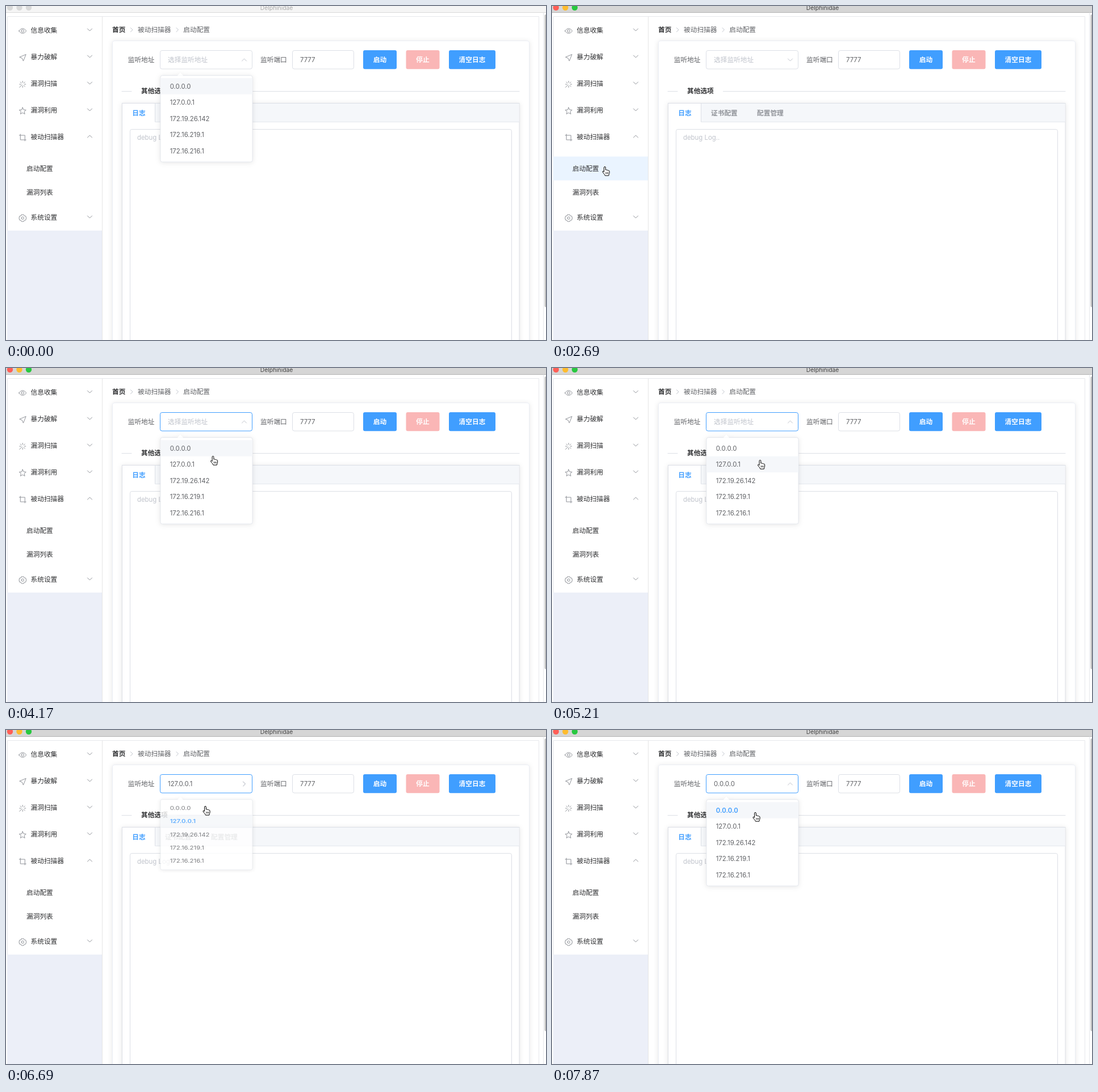
Recreate the animation shown at these times as an HTML page. Size 951 by 589 pixels, loop 8000 ms.

```html
<!DOCTYPE html>
<html lang="zh-CN">
<head>
<meta charset="utf-8">
<style>
html, body { margin: 0; width: 100%; height: 100%; overflow: hidden; background: #fff; }
svg { display: block; }
text { font: 11.7px Inter, "Noto Sans CJK SC", "Noto Sans CJK", sans-serif; fill: #606266; }
.latin { font-size: 11.4px; }
.dark { fill: #303133; }
.hint { fill: #c0c4cc; }
.tab { fill: #909399; }
.bold { font-weight: 600; }
.btn { fill: #fff; text-anchor: middle; font-weight: 600; }
.line { fill: none; stroke: #909399; stroke-linejoin: round; stroke-linecap: round; }
.soft { filter: drop-shadow(0 1.5px 4px rgba(0,0,0,.1)); }
</style>
</head>
<body>
<svg id="stage" width="951" height="589" viewBox="0 0 951 589"></svg>
<script>
const LOOP = 8000, TICK = 147.5;
const bursts = [0, 1790, 2690, 3870, 5060, 6110, 7280];
const hosts = ['0.0.0.0', '127.0.0.1', '172.19.26.142', '172.16.219.1', '172.16.216.1'];
// [time, x, y] of the pointer
const path = [
  [1790, 134, 381], [2080, 95, 291], [2690, 95, 291], [3270, 372, 116], [3410, 380, 109],
  [3720, 378, 105], [4020, 368, 150], [4165, 366.5, 163], [4470, 368, 171], [4750, 369, 178],
  [4900, 366, 233], [5060, 367, 190], [5200, 368.5, 170], [6110, 368.5, 170], [6400, 360, 100],
  [6560, 358, 92], [6700, 353, 142], [7130, 352, 147], [7430, 355, 92], [7570, 357, 90],
  [7722, 359, 130], [7870, 360, 153]
];
// [time, 1 = list opens, 0 = list closes]
const toggles = [[0, 0], [3620, 1], [6100, 0], [6597, 1], [7110, 0], [7570, 1]];

const rect = (x, y, w, h, fill, more = '') =>
  `<rect x="${x}" y="${y}" width="${w}" height="${h}" fill="${fill}" ${more}/>`;
const text = (x, y, s, cls = '', more = '') => `<text x="${x}" y="${y}" class="${cls}" ${more}>${s}</text>`;
const line = (d, color = '#909399', more = '') => `<path class="line" d="${d}" style="stroke:${color}" ${more}/>`;
const field = (x, y, w, h, more = '') => rect(x, y, w, h, '#fff', `rx="3.3" stroke="#dcdfe6" ${more}`);

const icons = [
  'M-6.5 0Q0-9 6.5 0Q0 9-6.5 0zM-2.3 0a2.3 2.3 0 1 0 4.6 0a2.3 2.3 0 1 0-4.6 0',
  'M5.5-5.5L-5.5-.8L-1 1L1 5.7z',
  'M-5.5 5.5L-1 1M0-5.5v2.5M5.5 0h-2.5M-5.5 0h2.5M0 5.5v-2.5M4-4l-2 2M-4-4l2 2M4 4l-2-2',
  'M0-6L1.8-2L6-1.6L2.9 1.2L3.8 5.5L0 3.3L-3.8 5.5L-2.9 1.2L-6-1.6L-1.8-2z',
  'M-6-4H4V6M-4-6V4H6',
  'M-2-6H2L3-4L5.5-3.5L6.3 0L5.5 3.5L3 4L2 6H-2L-3 4L-5.5 3.5L-6.3 0L-5.5-3.5L-3-4zM-2.2 0a2.2 2.2 0 1 0 4.4 0a2.2 2.2 0 1 0-4.4 0'
];
const menu = ['信息收集', '暴力破解', '漏洞扫描', '漏洞利用', '被动扫描器', '系统设置'].map((name, i) => {
  const y = i < 5 ? 43 + 47 * i : 373;
  const arrow = i == 4 ? `M143.5 ${y + 1}l4-4l4 4` : `M143.5 ${y - 3}l4 4l4-4`;
  return line(icons[i], '#909399', `transform="translate(29.3 ${y + 1})"`) +
    text(43.5, y + 4.3, name, 'dark') + line(arrow);
}).join('');

const button = (x, w, color, name) =>
  rect(x, 78, w, 33.3, color, 'rx="3"') + text(x + w / 2, 99, name, 'btn');

stage.innerHTML =
  // window
  rect(0, 0, 951, 589, '#fff') +
  rect(0, 0, 951, 11, '#d6d6d6', 'id="bar"') + rect(0, 11, 951, 1, '#b4b4b4', 'id="edge"') +
  [7, 23.5, 40].map(x => `<circle class="light" cx="${x}" cy="2.8" r="5.2"/>`).join('') +
  text(476.5, 6.6, 'Delphinidae', '', 'id="title" text-anchor="middle" style="font-size:10.3px"') +
  line('M2.5 589V18.5H938.5V589M946.5 12V589', '#e6e8ec') +
  rect(948.5, 15, 4, 516, '#c1c1c1', 'rx="2"') +
  // sidebar
  rect(2, 396, 167, 193, '#eceff8') +
  rect(2, 265.5, 167, 42, '#eaf4ff', 'id="focus"') +
  line('M169.5 19V589', '#e6e6e6') + menu +
  text(36, 291.3, '启动配置', 'dark') + text(36, 333.3, '漏洞列表', 'dark') +
  // breadcrumb
  text(187, 46.3, '首页', 'dark bold') + text(232, 46.3, '被动扫描器') + text(312.3, 46.3, '启动配置') +
  line('M219.5 38.5l3.5 3.5l-3.5 3.5M300 38.5l3.5 3.5l-3.5 3.5', '#c0c4cc') +
  // form
  rect(187.5, 61.5, 734, 600, '#fff', 'rx="3.5" stroke="#ebeef5" class="soft"') +
  text(214.7, 99.3, '监听地址') + field(271.5, 78.5, 162, 32.5, 'id="select"') +
  text(285, 99.2, '', 'latin', 'id="value"') + line('M-4 2l4-4l4 4', '#c0c4cc', 'id="caret"') +
  text(448, 99.3, '监听端口') + field(504.5, 78.5, 108, 32.5) + text(518, 99.2, '7777', 'latin') +
  button(629, 59, '#409eff', '启动') + button(704.5, 59, '#fab6b6', '停止') + button(780, 82, '#409eff', '清空日志') +
  line('M204 150.5H221M301.5 150.5H904', '#dcdfe6') + text(238, 154.3, '其他选项', 'dark bold') +
  // tabs
  rect(204.5, 171.5, 699.5, 500, '#fff', 'stroke="#dcdfe6" class="soft"') +
  rect(205, 172, 698.5, 32, '#f5f7fa') + line('M205 204.5H903.5', '#e4e7ed') +
  rect(205, 172, 57.5, 34, '#fff') + line('M262.5 172V204', '#dcdfe6') +
  text(222.3, 192.8, '日志', 'bold', 'style="fill:#409eff"') +
  text(280, 192.8, '证书配置', 'tab bold') + text(361, 192.8, '配置管理', 'tab bold') +
  field(218.5, 217.5, 672, 450) + text(231, 235.6, 'debug Log..', 'latin hint') +
  // drop-down list
  '<g id="list"><g class="soft">' + rect(272, 122.5, 162, 152.5, '#fff', 'rx="3.3" stroke="#e4e7ed"') +
  '<path d="M302 122.8L307 117.5L312 122.8z" fill="#fff"/></g>' +
  rect(272, 0, 162, 28.5, '#f5f7fa', 'id="hover"') +
  hosts.map((h, i) => text(288.7, 145.7 + 28.5 * i, h, 'latin host')).join('') + '</g>' +
  // pointer
  '<g id="hand"><path d="M-3.4 1.5V-6q0-1.6 1.4-1.6t1.4 1.6v4q1.8-.9 2.4.5q1.8-.7 2.3.7q2-.4 2 1.3v2.5q0 1.5-.8 2.8l-.5 2.3h-6.4q-.6-2-2.2-3.6l-2-2.6q-.6-1.7 1-1.8z" fill="#fff" stroke="#000" stroke-linejoin="round"/>' +
  '<path d="M-.2 2.2v3M1.8 2.2v3M3.7 2.2v3" stroke="#000" stroke-width=".8"/></g>';

const $ = id => document.getElementById(id);
const set = (id, name, v) => $(id).setAttribute(name, v);
const lights = document.querySelectorAll('.light');
const rows = document.querySelectorAll('.host');

function pointerAt(t) {
  const i = path.findIndex(p => p[0] > t);
  if (i < 0) return path[path.length - 1].slice(1);
  if (!i) return [0, 0];
  const [a, b] = [path[i - 1], path[i]];
  const u = (t - a[0]) / (b[0] - a[0]);
  return [1, 2].map(k => a[k] + (b[k] - a[k]) * u);
}

function draw(t) {
  const active = t >= 1500;
  set('bar', 'fill', active ? '#d6d6d6' : '#f5f5f5');
  set('edge', 'fill', active ? '#b4b4b4' : '#d9d9d9');
  $('title').style.fill = active ? '#444' : '#aaa';
  lights.forEach((l, i) => l.setAttribute('fill', active ? ['#ff5f57', '#febc2e', '#28c840'][i] : '#d9d9d9'));

  // the screen is sampled in coarse ticks within each burst
  const start = bursts.filter(b => b <= t).pop();
  const q = start + Math.floor((t - start + 12) / TICK) * TICK;

  const [x, y] = pointerAt(q);
  set('hand', 'transform', `translate(${x} ${y})`);
  set('hand', 'visibility', t >= 1790 ? 'visible' : 'hidden');
  set('focus', 'visibility', q >= 2690 && q < 3550 ? 'visible' : 'hidden');
  set('select', 'stroke', q < 3350 ? '#dcdfe6' : q < 3550 ? '#c0c4cc' : '#409eff');

  const picked = q < 6110 ? -1 : q < 7125 ? 1 : 0;
  $('value').textContent = hosts[picked] || '选择监听地址';
  $('value').style.fill = picked < 0 ? '#c0c4cc' : '#606266';
  $('value').style.fontSize = picked < 0 ? '11.7px' : '11.4px';
  rows.forEach((r, i) => {
    r.style.fill = i == picked ? '#409eff' : '#606266';
    r.style.fontWeight = i == picked ? 600 : 400;
  });
  set('hover', 'y', 127.2 + 28.5 * (q < 4200 || q > 6950 ? 0 : 1));

  const [since, opening] = toggles.filter(s => s[0] <= q).pop();
  const u = Math.min(1, (q - since) / 300);
  const toward = v => opening ? v : 1 - v;
  const open = toward(1 - (1 - u) ** 4);
  set('list', 'opacity', open);
  set('list', 'transform', `translate(0 122) scale(1 ${open}) translate(0 -122)`);
  set('caret', 'transform', `translate(419.5 95) rotate(${180 * (1 - toward(Math.sin(u * Math.PI / 2)))})`);
}

function tick() {
  draw(performance.now() % LOOP);
  requestAnimationFrame(tick);
}
tick();
</script>
</body>
</html>
```
